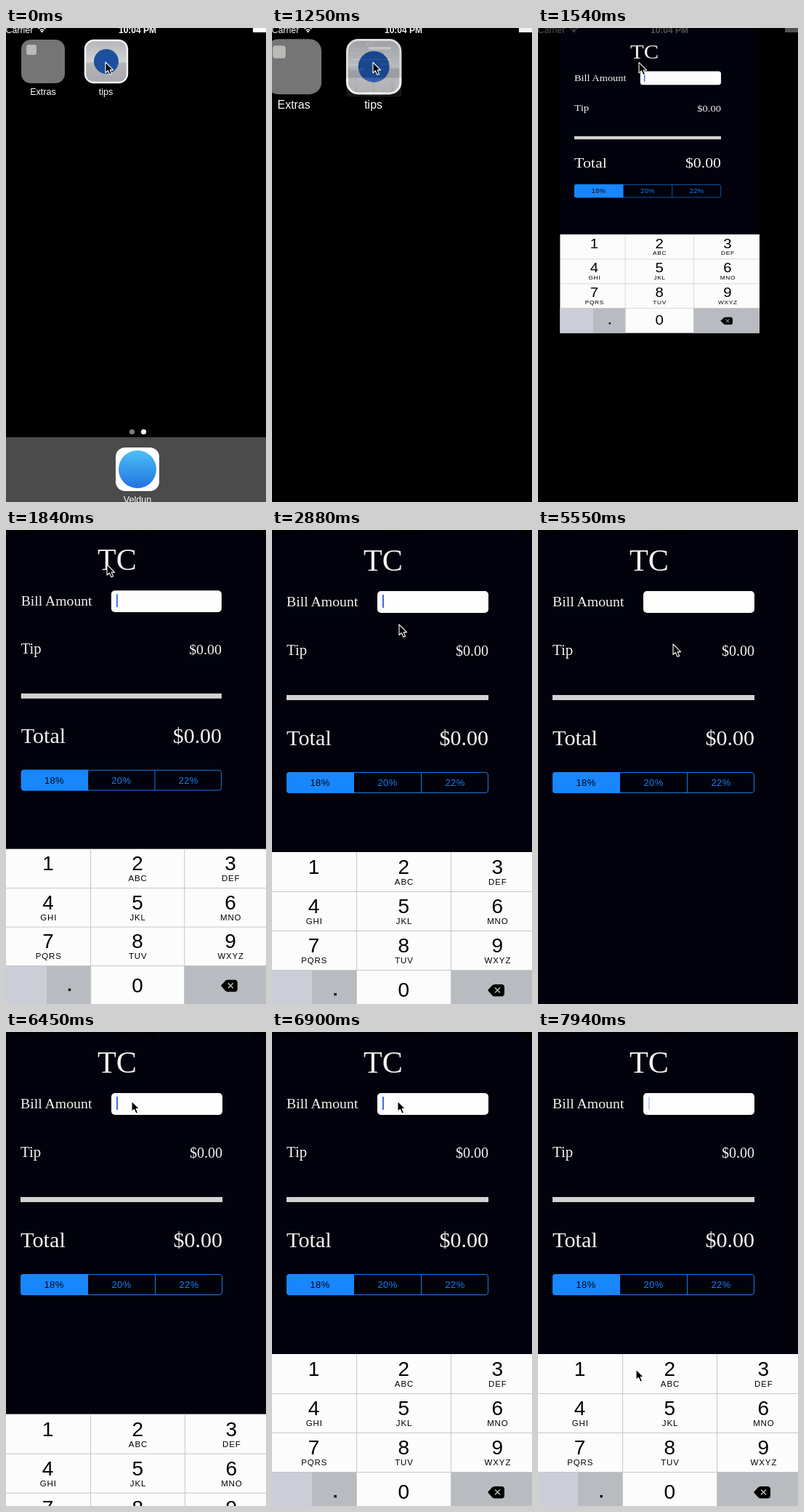
An HTML page that plays this animation: 358x652 px, repeating every 8 s.

```html
<!DOCTYPE html>
<html lang="en">
<head>
<meta charset="utf-8">
<title>Tip calculator</title>
<style>
html, body { margin: 0; width: 100%; height: 100%; overflow: hidden; background: #000; }
svg { display: block; width: 358px; height: 652px; }
text { font-family: "Liberation Sans", Arial, sans-serif; }
.serif text { font-family: "Liberation Serif", Times, serif; fill: #f4f4f4; }
</style>
</head>
<body>
<svg viewBox="0 0 358 652">
  <defs>
    <linearGradient id="metal" x2="0" y2="1">
      <stop offset="0" stop-color="#b4b5b8"/>
      <stop offset=".5" stop-color="#d2d3d5"/>
      <stop offset=".55" stop-color="#b3b4b6"/>
      <stop offset="1" stop-color="#a8a9ac"/>
    </linearGradient>
    <linearGradient id="sky" x2="0" y2="1">
      <stop offset="0" stop-color="#4cc0f6"/>
      <stop offset="1" stop-color="#2273e2"/>
    </linearGradient>
  </defs>
  <rect width="358" height="652"/>

  <g id="home" font-size="12.6" fill="#fff" text-anchor="middle">
    <rect y="563" width="358" height="89" fill="#4b4b4b"/>
    <rect x="21" y="16" width="60" height="60" rx="13" fill="#757575"/>
    <rect x="28" y="23" width="14" height="14" rx="3" fill="#b9bcb6"/>
    <text x="51" y="92">Extras</text>
    <rect x="109" y="17" width="58" height="58" rx="12" fill="url(#metal)" stroke="#f6f6f6" stroke-width="2.4"/>
    <circle cx="138" cy="46" r="17" fill="#1d4f9e"/>
    <text x="137.5" y="92">tips</text>
    <circle cx="173.5" cy="555.5" r="3.6" fill="#7d7d7d"/>
    <circle cx="189.5" cy="555.5" r="3.6"/>
    <rect x="151" y="577" width="60" height="60" rx="13"/>
    <circle cx="181" cy="607" r="26" fill="url(#sky)"/>
    <text x="181" y="653">Veldun</text>
  </g>

  <g id="app">
    <rect x="-7" y="-7" width="378" height="667" fill="#01020c"/>
    <rect x="-7" y="650" width="378" height="10"/>
    <g class="serif">
      <text x="126" y="55.5" font-size="42.3">TC</text>
      <text x="20" y="105" font-size="19.8">Bill Amount</text>
      <text x="20" y="172" font-size="20.8">Tip</text>
      <text x="298" y="172.5" font-size="20" text-anchor="end">$0.00</text>
      <text x="20" y="295.5" font-size="30.3">Total</text>
      <text x="298" y="295.5" font-size="30" text-anchor="end">$0.00</text>
    </g>
    <rect x="145" y="84" width="153" height="30" rx="5" fill="#fdfdfd"/>
    <rect id="caret" x="152" y="89" width="2" height="18" fill="#4369e0"/>
    <rect x="20" y="227" width="278" height="7" fill="#d3d1d4"/>
    <g fill="none" stroke="#1b7be6">
      <rect x="20.5" y="333.5" width="277" height="28" rx="3.5"/>
      <path d="M205.5 334V361"/>
    </g>
    <path d="M113 333H24q-4 0-4 4v21q0 4 4 4H113z" fill="#1886fc"/>
    <g font-size="13" letter-spacing=".4" text-anchor="middle" fill="#1a7ff0">
      <text x="66" y="352" fill="#02061c">18%</text>
      <text x="159" y="352">20%</text>
      <text x="252" y="352">22%</text>
    </g>
    <g id="keyboard">
      <rect x="-7" y="443" width="378" height="217" fill="#fcfcfc"/>
      <g id="keys" text-anchor="middle"></g>
      <rect x="-7" y="605" width="62" height="55" fill="#ccced7"/>
      <path d="M55 605H117V660H55zM246 605H371V660H246z" fill="#b8bbbf"/>
      <path d="M-7 497.5H371M-7 551.5H371M-7 605.5H371M116.5 443V660M246.5 443V660" stroke="#c6c7c9" fill="none"/>
      <rect x="85.5" y="637" width="3.4" height="3.4"/>
      <path d="M297 633l6-6.5q1.5-1.5 4-1.5h9q4 0 4 4v8.5q0 4-4 4h-9q-2.5 0-4-1.5z"/>
      <path d="M307 629.5l7 7m0-7l-7 7" stroke="#c4c6c9" stroke-width="1.3"/>
    </g>
  </g>

  <g id="status" font-size="12.4" fill="currentColor">
    <text x="-.5" y="7">Carrier</text>
    <path d="M44.5 1.2q5-4 10 0M46.7 3.3q2.8-2.2 5.6 0" fill="none" stroke="currentColor" stroke-width="1.4"/>
    <path d="M49.5 6.5l-2-2q2-1.5 4 0z"/>
    <text x="155" y="7" font-size="12" font-weight="bold">10:04 PM</text>
    <rect x="340" y="-2" width="18" height="8"/>
  </g>

  <path id="cursor" d="M0 0V14.5L3.4 11.5 6 17.3 8.6 16.2 6.2 10.6H10.6z" stroke="#fff" stroke-width="1.1" stroke-linejoin="round"/>
</svg>
<script>
const $ = id => document.getElementById(id);
const LOOP = 8000, FIRST_STEP = 488, STEP = 148.8;

// Progress per step while the app opens and drop per step while the keyboard rises.
const OPENING = [.05, .3, .675, .93, .992, .998, 1];
const RISE = [82.6, 14, 2];

// Pointer path as [step, x, y].
const CURSOR = [
  [-1, 137, 47], [0, 138, 47], [1, 139, 47], [9, 139, 47.5], [12, 170, 100], [14, 177, 105], [15, 177, 105],
  [16, 175, 130], [19, 143, 440], [20, 143, 456], [21, 160, 455], [23, 195, 402], [24, 196, 391], [31, 196, 391],
  [32, 196, 398], [33, 193, 270], [34, 186, 157], [35, 180, 115], [37, 172, 96], [38, 173, 95], [43, 173, 95],
  [44, 172, 150], [46, 167, 420], [47, 167, 436], [48, 167, 436], [50, 135, 464]
];

const mix = (a, b, p) => a + (b - a) * p;

function buildKeys() {
  const letters = ["", "ABC", "DEF", "GHI", "JKL", "MNO", "PQRS", "TUV", "WXYZ"];
  const centers = [57.6, 181.3, 310.2];
  const label = (x, y, size, text, spacing = 0) =>
    `<text x="${x}" y="${y}" font-size="${size}" letter-spacing="${spacing}">${text}</text>`;
  $("keys").innerHTML = letters.map((word, i) => {
    const x = centers[i % 3], y = 473 + 54 * Math.floor(i / 3);
    return label(x, y, 28, i + 1) + label(x + .7, y + 15, 11.5, word, .9);
  }).join("") + label(centers[1], 642, 28, 0);
}

function cursorAt(step) {
  const next = CURSOR.findIndex(key => key[0] >= step);
  if (next <= 0) return CURSOR[0].slice(1);
  const [a, ax, ay] = CURSOR[next - 1], [b, bx, by] = CURSOR[next];
  const p = (step - a) / (b - a);
  return [mix(ax, bx, p), mix(ay, by, p)];
}

function caretAt(step) {
  if (step < 13) return 1;
  if (step >= 24 && step < 40) return 0;
  const turns = (step - (step < 24 ? 13 : 50)) / 6.72;
  const phase = turns - Math.floor(turns);
  return phase < .1 ? .3 : phase < .44 ? 0 : 1;
}

function keyboardDrop(step) {
  if (step < 27) return 0;
  if (step < 40) return step === 27 ? 130 : 217;
  return RISE[step - 40] || 0;
}

function drawOpening(p) {
  // The top and bottom edges trail the sides while the icon grows into the app.
  const lag = p - .395 * p * (1 - p);
  const left = mix(108, -7, p), top = mix(16, -7, lag);
  const width = mix(168, 371, p) - left, height = mix(76, 660, lag) - top;
  const grey = Math.round(255 * (1 - p));
  $("home").setAttribute("transform", `translate(${left} ${top}) scale(${width / 60}) translate(-108 -16)`);
  $("home").style.display = p > .6 ? "none" : "";
  $("app").setAttribute("transform", `translate(${left} ${top}) scale(${width / 378} ${height / 667}) translate(7 7)`);
  $("app").setAttribute("opacity", Math.min(1, p * 2.2));
  $("status").setAttribute("color", `rgb(${grey},${grey},${grey})`);
}

function draw(time) {
  const step = Math.floor((time - FIRST_STEP) / STEP);
  drawOpening(step < 5 ? 0 : OPENING[step - 5] ?? 1);
  $("caret").setAttribute("opacity", caretAt(step));
  $("keyboard").setAttribute("transform", `translate(0 ${keyboardDrop(step)})`);
  $("cursor").setAttribute("transform", `translate(${cursorAt(step).join(" ")})`);
}

buildKeys();
const start = performance.now();
function tick() {
  draw((performance.now() - start) % LOOP);
  requestAnimationFrame(tick);
}
tick();
</script>
</body>
</html>
```
